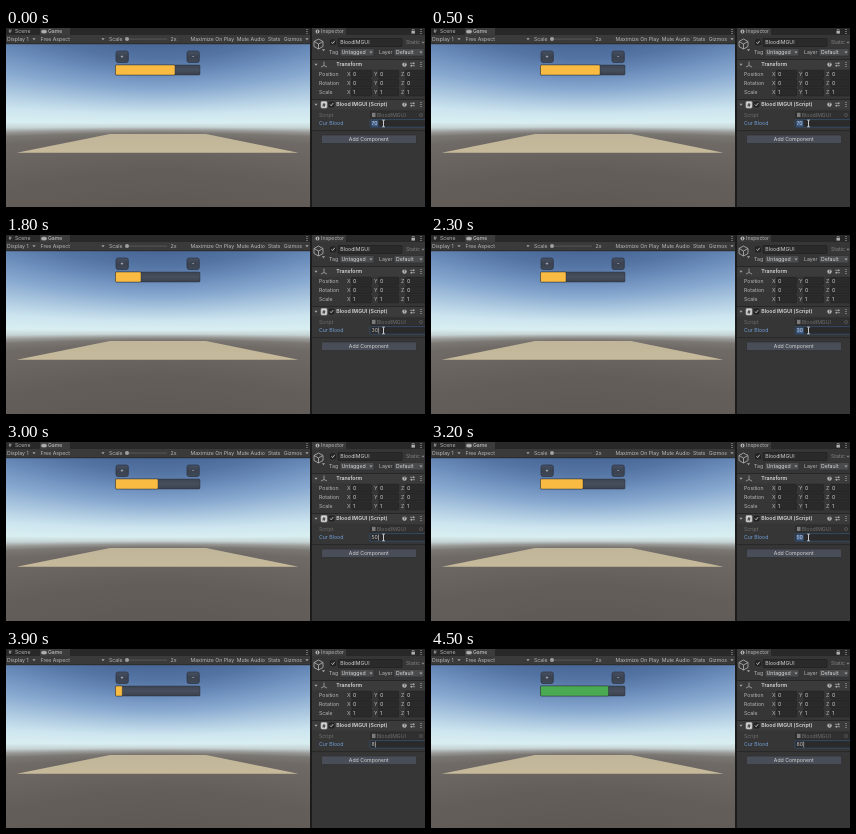
These frames come from a looping animation (419x179 px, 4600 ms). An HTML page with a canvas:

```html
<!DOCTYPE html>
<html>
<head>
<meta charset="utf-8">
<style>
html, body { margin: 0; width: 100%; height: 100%; overflow: hidden; background: #363636; }
canvas { display: block; }
</style>
</head>
<body>
<canvas id="stage" width="419" height="179"></canvas>
<script>
const ctx = document.getElementById('stage').getContext('2d');
const LOOP = 4600;

// start time, field value, whether the value is selected
const steps = [
  [0, 70, true], [700, 0, true],
  [1300, 3, false], [1500, 30, false], [2000, 30, true],
  [2600, 5, false], [2800, 50, false], [3200, 50, true],
  [3800, 8, false], [4000, 80, false]
];

function rect(x, y, w, h, fill) {
  ctx.fillStyle = fill;
  ctx.fillRect(x, y, w, h);
}

function box(x, y, w, h, fill, edge, radius = 1) {
  ctx.beginPath();
  ctx.roundRect(x, y, w, h, radius);
  ctx.fillStyle = fill;
  ctx.fill();
  ctx.strokeStyle = edge;
  ctx.lineWidth = 0.7;
  ctx.stroke();
}

function shape(points, fill) {
  ctx.beginPath();
  for (const [x, y] of points) ctx.lineTo(x, y);
  ctx.closePath();
  ctx.fillStyle = fill;
  ctx.fill();
}

function line(color, width, ...points) {
  ctx.beginPath();
  for (const [x, y] of points) ctx.lineTo(x, y);
  ctx.strokeStyle = color;
  ctx.lineWidth = width;
  ctx.stroke();
}

function text(s, x, y, color = '#b8b8b8', weight = 400, align = 'left') {
  ctx.font = `${weight} 5.2px Inter, sans-serif`;
  ctx.textAlign = align;
  ctx.textBaseline = 'alphabetic';
  ctx.fillStyle = color;
  ctx.fillText(s, x, y + 1.8);
}

function dot(x, y, r, color) {
  ctx.beginPath();
  ctx.arc(x, y, r, 0, Math.PI * 2);
  ctx.fillStyle = color;
  ctx.fill();
}

function arrow(x, y, color = '#a8a8a8') {
  shape([[x - 1.6, y - 0.8], [x + 1.6, y - 0.8], [x, y + 1.2]], color);
}

function kebab(x, y) {
  for (const d of [-2, 0, 2]) dot(x, y + d, 0.6, '#b8b8b8');
}

function check(x, y) {
  box(x - 2.5, y - 2.5, 5, 5, '#2a2a2a', '#181818');
  line('#d0d0d0', 0.8, [x - 1.5, y], [x - 0.4, y + 1.3], [x + 1.8, y - 1.5]);
}

function gradient(top, bottom, stops) {
  const g = ctx.createLinearGradient(0, top, 0, bottom);
  for (const [y, color] of stops) g.addColorStop((y - top) / (bottom - top), color);
  return g;
}

// The sky follows the elevation angle, so each column is stretched about the horizon.
function drawScene() {
  const horizon = 97, focal = 141;
  const sky = gradient(-81, 82, [
    [-81, '#486796'], [-66, '#5474a4'], [-51, '#6a8cba'], [-36, '#87a8cf'],
    [-22, '#aecae1'], [-11, '#cde5ef'], [-2, '#d8eef1'], [2, '#c6d3d4'],
    [5, '#989996'], [8, '#7a7672'], [13, '#6f6a66'], [27, '#6a6460'],
    [43, '#645e5a'], [82, '#5f5955']
  ]);
  ctx.save();
  ctx.beginPath();
  ctx.rect(0, 16, 304, 163);
  ctx.clip();
  for (let x = 0; x < 304; x++) {
    const stretch = Math.hypot(1, (x - 152) / focal);
    ctx.setTransform(1, 0, 0, stretch, 0, horizon);
    rect(x, -82, 1, 165, sky);
  }
  ctx.restore();
  shape([[104, 106], [200, 106], [292.5, 124.8], [10.7, 124.8]],
    gradient(106, 125, [[106, '#c0b59a'], [125, '#c7ba9b']]));
}

function drawToolbar() {
  rect(0, 0, 304, 7, '#282828');
  rect(34, 0, 30, 7, '#3c3c3c');
  rect(0, 7, 304, 9, '#3a3a3a');
  rect(0, 15.5, 304, 0.7, '#232323');
  text('#', 2.5, 3.5);
  text('Scene', 9, 3.5);
  box(35.5, 2.2, 5, 2.8, '#b0b0b0', '#b0b0b0', 1.3);
  text('Game', 42, 3.5, '#d2d2d2');
  kebab(301, 3.5);
  text('Display 1', 1, 11.3);
  arrow(28, 11);
  text('Free Aspect', 34.5, 11.3);
  arrow(97, 11);
  text('Scale', 103, 11.3);
  rect(120, 10.7, 41, 0.8, '#5c5c5c');
  dot(121, 11, 2, '#a0a0a0');
  text('2x', 164.5, 11.3);
  text('Maximize On Play', 184.5, 11.3);
  text('Mute Audio', 230.7, 11.3);
  text('Stats', 262, 11.3);
  text('Gizmos', 277.7, 11.3);
  arrow(301, 11);
}

function drawHeader(title, y) {
  rect(306, y - 5, 113, 10, '#3b3b3b');
  rect(306, y - 5.5, 113, 0.8, '#222');
  arrow(310, y);
  text(title, 330.3, y, '#d6d6d6', 600);
  dot(398.5, y, 2.2, '#b4b4b4');
  text('?', 398.5, y, '#333', 600, 'center');
  line('#b0b0b0', 0.7, [404, y - 1.2], [409, y - 1.2]);
  line('#b0b0b0', 0.7, [404, y + 1.2], [409, y + 1.2]);
  rect(407, y - 2.2, 0.8, 2, '#b0b0b0');
  rect(405, y + 0.2, 0.8, 2, '#b0b0b0');
  kebab(415, y);
}

function drawInspector() {
  rect(304, 0, 2, 179, '#1c1c1c');
  rect(306, 0, 113, 179, '#363636');
  rect(306, 0, 113, 7, '#282828');
  rect(306, 0, 34, 7, '#3a3a3a');
  dot(311.5, 3.5, 2, '#b0b0b0');
  rect(311.1, 2.4, 0.8, 2.4, '#333');
  text('Inspector', 315, 3.5);
  rect(405.5, 3, 3.4, 2.6, '#b0b0b0');
  line('#b0b0b0', 0.6, [406.2, 3], [406.2, 1.5], [408.2, 1.5], [408.2, 3]);
  kebab(415, 3.5);

  const hex = [[312.5, 11], [317, 13.5], [317, 18.5], [312.5, 21], [308, 18.5], [308, 13.5]];
  line('#b5b5b5', 0.8, ...hex, hex[0]);
  line('#b5b5b5', 0.8, hex[5], [312.5, 16], hex[1]);
  line('#b5b5b5', 0.8, [312.5, 16], hex[3]);
  arrow(317.5, 22);
  check(327, 14.3);
  box(332, 10.5, 64, 8, '#2a2a2a', '#202020');
  text('BloodIMGUI', 334.3, 14.5, '#d2d2d2');
  text('Static', 400, 14.5, '#858585');
  arrow(417, 14.5, '#858585');
  text('Tag', 323, 24.3);
  box(334, 20.5, 34, 7.5, '#4a4b4d', '#303030');
  text('Untagged', 335.5, 24.3, '#d6d6d6');
  arrow(365, 24.3);
  text('Layer', 373, 24.3);
  box(388, 20.5, 30, 7.5, '#4a4b4d', '#303030');
  text('Default', 390, 24.3, '#d6d6d6');
  arrow(415, 24.3);

  drawHeader('Transform', 36.5);
  line('#a8a8a8', 0.8, [318, 33.5], [318, 37.5], [321, 39]);
  line('#a8a8a8', 0.8, [318, 37.5], [315, 39]);
  ['Position', 'Rotation', 'Scale'].forEach((name, row) => {
    const y = 46.2 + row * 8.9;
    text(name, 313, y);
    ['X', 'Y', 'Z'].forEach((axis, i) => {
      const x = 341 + i * 27;
      text(axis, x, y);
      box(x + 4.5, y - 3.8, 20, 7.6, '#2a2a2a', '#232323');
      text(row === 2 ? '1' : '0', x + 6, y, '#d2d2d2');
    });
  });

  drawHeader('Blood IMGUI (Script)', 76.5);
  box(315, 73.5, 6, 6.5, '#d8d8d8', '#aaa');
  text('#', 318, 76.7, '#333', 700, 'center');
  check(325.5, 76.5);
  text('Script', 313, 87, '#707070');
  box(364.5, 83.2, 54, 7.4, '#303030', '#2a2a2a');
  rect(366, 84.8, 3.5, 4.2, '#7b7b7b');
  text('BloodIMGUI', 370.7, 87, '#707070');
  dot(415, 87, 1.8, '#606060');
  dot(415, 87, 1.1, '#323232');
  text('Cur Blood', 313, 95.4, '#729fd8');
  rect(306, 102.3, 113, 0.8, '#242424');
  box(315.5, 107, 95, 8.6, '#484d57', '#303030');
  text('Add Component', 362.8, 111.3, '#d2d2d2', 400, 'center');
}

function drawButton(x, label) {
  box(x, 23, 12.3, 11.5, gradient(23, 35, [[23, '#465062'], [29, '#3a4250'], [35, '#414a59']]), '#2b3340', 2);
  text(label, x + 6.1, 28.5, '#ccc', 600, 'center');
}

function drawBar(value) {
  const tone = value > 70 ? '#49aa52' : '#f9bb42';
  const edge = 'rgba(34, 40, 50, 0.6)';
  box(109.5, 37, 84.5, 10, gradient(37, 47, [[37, '#3c4452'], [42, '#474f5e'], [47, '#3a404c']]), edge);
  if (value) box(109.5, 37, 85 * value / 100, 10, tone, edge);
}

function drawField(value, selected, pointer) {
  box(364, 91.6, 56, 7.6, '#2a2a2a', '#35567c');
  const label = String(value);
  ctx.font = '400 5.2px Inter, sans-serif';
  const width = ctx.measureText(label).width;
  if (selected) rect(365.3, 92.5, width + 0.8, 6, '#40618f');
  text(label, 365.5, 95.4, '#c8c8c8');
  if (!selected) rect(366 + width, 92.5, 0.6, 6, '#ccc');
  if (pointer) {
    line('#ddd', 0.9, [377.5, 92.3], [377.5, 98.8]);
    line('#ddd', 0.7, [376, 92.1], [379, 92.1]);
    line('#ddd', 0.7, [376, 98.8], [379, 98.8]);
  }
}

const start = performance.now();

function frame(now) {
  const t = Math.max(0, now - start) % LOOP;
  const [, value, selected] = steps.findLast(s => s[0] <= t);
  drawScene();
  drawToolbar();
  drawInspector();
  drawButton(110, '+');
  drawButton(181, '-');
  drawBar(value);
  drawField(value, selected, t < 3800);
  requestAnimationFrame(frame);
}

requestAnimationFrame(frame);
</script>
</body>
</html>
```
